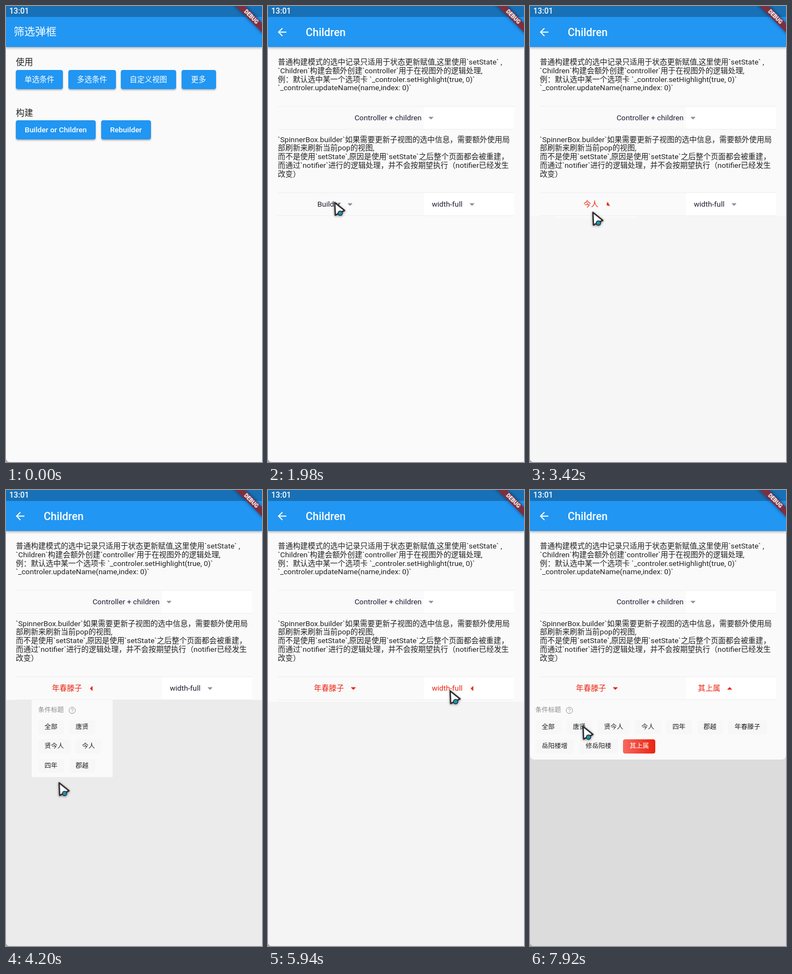
An HTML page that plays this animation: 468 by 834 pixels, repeating every 8 s.

```html
<!DOCTYPE html>
<html lang="zh-CN">
<head>
<meta charset="utf-8">
<title>Spinner</title>
<style>
html, body { margin: 0; width: 100%; height: 100%; overflow: hidden; background: #a9a9a9; }
body, .home, .page { font: 13.7px/15.75px Roboto, "Noto Sans CJK SC", "Noto Sans CJK", sans-serif; color: #212121; }
#stage { position: absolute; left: 0; top: 0; width: 468px; height: 834px; overflow: hidden; border-radius: 0 0 0 7px; }
#stage div, #stage svg.abs { position: absolute; white-space: pre; }
#stage .home, #stage .page, #stage .veil { left: 0; top: 0; width: 468px; height: 834px; background: #fafafa; }
#stage .veil { background: #000; opacity: 0; }
#stage .page { transform: translateX(490px); box-shadow: -2px 0 5px rgba(0,0,0,.22); }
.bar { left: 0; top: 0; width: 468px; height: 75px; background: #2196f3; box-shadow: 0 2px 4px rgba(0,0,0,.3); }
.title { top: 36px; color: #fff; font-size: 19.6px; line-height: 24px; }
.title.en, .btn.en { font-weight: 500; }
.title.en { top: 37px; }
.label { left: 18px; font-size: 15.7px; line-height: 20px; }
.btn { height: 35.3px; line-height: 35.3px; border-radius: 4px; background: #2196f3; color: #fff; text-align: center;
  box-shadow: 0 2px 3px rgba(0,0,0,.28); }
.text { left: 18px; }
.row { left: 18px; width: 432px; height: 41px; border: solid #eee; border-width: 1px 0;
  background: linear-gradient(90deg, #fafafa 267px, #fff 267px); }
.cell { top: 0; height: 41px; color: #1d1d33; --arrow: #8f8f99; }
.pick { inset: 0; display: flex; align-items: center; justify-content: center; gap: 5px; }
.pick svg { width: 24px; height: 24px; fill: var(--arrow); stroke: var(--arrow); stroke-linejoin: round; }
.barrier { left: 0; top: 384px; width: 468px; height: 450px; background: #000; opacity: 0; }
.panel { top: 384px; box-sizing: border-box; padding: 0 11.8px; background: #fafafa; border-radius: 0 0 8px 8px;
  font-size: 11.75px; clip-path: inset(0 0 100% 0); }
.panel.wide { padding: 0 9.8px; }
.head { top: 11px; color: #8c8c8c; }
.head svg { position: absolute; left: 55px; top: 1px; }
.chips { top: 37px; display: flex; flex-wrap: wrap; gap: 9.75px 9.8px; }
#stage .chip { position: relative; padding: 0 11.75px; line-height: 25.6px; border-radius: 4px; background: #f7f7f7; }
.chip b { position: absolute; inset: 0; text-align: center; font-weight: 400; border-radius: 4px; color: #fff;
  background: linear-gradient(90deg, #f7695f, #ea230f); opacity: 0; }
.status { left: 0; top: 0; width: 468px; height: 20px; background: rgba(0,0,0,.25); }
.clock { left: 6px; top: 1.5px; color: #fff; font-size: 14.2px; font-weight: 500; }
.debug { left: 408px; top: 13.5px; width: 80px; height: 12px; transform: rotate(45deg); background: #7c2f41;
  box-shadow: 0 0 6px rgba(0,0,0,.5); color: #fff; font-size: 10px; line-height: 12.4px; font-weight: 900; text-align: center; }
.cursor { left: -1px; top: -1px; overflow: visible; filter: drop-shadow(0 1px 2px rgba(0,0,0,.45)); }
</style>
</head>
<body>
<div id="stage">
  <div class="home">
    <div class="bar"></div>
    <div class="title" style="left:14px">筛选弹框</div>
    <div class="label" style="top:93px">使用</div>
    <div class="btn" style="left:18px;top:116.5px;width:86.3px">单选条件</div>
    <div class="btn" style="left:114px;top:116.5px;width:86.5px">多选条件</div>
    <div class="btn" style="left:210px;top:116.5px;width:100.6px">自定义视图</div>
    <div class="btn" style="left:320.5px;top:116.5px;width:63px">更多</div>
    <div class="label" style="top:186px">构建</div>
    <div class="btn en" style="left:18px;top:209px;width:146px">Builder or Children</div>
    <div class="btn en" style="left:174px;top:209px;width:90.5px">Rebuilder</div>
  </div>
  <div class="veil"></div>
  <div class="page">
    <div class="bar"></div>
    <svg class="abs" style="left:14px;top:36px" width="23.5" height="23.5" viewBox="0 0 24 24"><path fill="#fff" d="M20 11H7.83l5.59-5.59L12 4l-8 8 8 8 1.41-1.41L7.83 13H20z"/></svg>
    <div class="title en" style="left:69px">Children</div>
    <div class="text" style="top:95px">普通构建模式的选中记录只适用于状态更新赋值,这里使用`setState` ,
`Children`构建会额外创建`controller`用于在视图外的逻辑处理,
例：默认选中某一个选项卡 `_controler.setHighlight(true, 0)`
`_controler.updateName(name,index: 0)`</div>
    <div class="row" style="top:183px"><div class="cell" id="single" style="left:0;width:432px"></div></div>
    <div class="text" style="top:236.5px">`SpinnerBox.builder`如果需要更新子视图的选中信息，需要额外使用局
部刷新来刷新当前pop的视图,
而不是使用`setState`,原因是使用`setState`之后整个页面都会被重建，
而通过`notifier`进行的逻辑处理，并不会按期望执行（notifier已经发生
改变）</div>
    <div class="row" style="top:341px">
      <div class="cell" id="left" style="left:0;width:216px"></div>
      <div class="cell" id="right" style="left:216px;width:216px"></div>
    </div>
    <div class="barrier"></div>
    <div class="panel" id="narrow" style="left:47px;width:147.5px;height:286px"></div>
    <div class="panel wide" id="wide" style="left:0;width:468px;height:109px"></div>
  </div>
  <div class="status"></div>
  <div class="debug">DEBUG</div>
  <div class="clock">13:01</div>
  <svg class="abs cursor" width="26" height="30"><path d="M2 2.5L3 25.5L20 17Z" fill="#fff" stroke="#2f2f33" stroke-width="2.6" stroke-linejoin="round"/><circle cx="12" cy="22" r="4" fill="#1597b5" stroke="#2f2f33" stroke-width="1.6"/></svg>
</div>
<script>
const LOOP = 8000;
const RED = '#ea230f';
const $ = s => document.querySelector(s);

// steps: [ms, properties, easing towards the next step]
function play(el, steps) {
  const first = steps[0], last = steps[steps.length - 1];
  const all = [...steps];
  if (first[0] > 0) all.unshift([0, first[1]]);
  if (last[0] < LOOP) all.push([LOOP, last[1]]);
  el.animate(all.map(([ms, props, easing = 'linear']) => ({ offset: ms / LOOP, easing, ...props })),
    { duration: LOOP, iterations: Infinity });
}

// Switches between two states during the given spans of time.
function toggle(el, spans, off, on, inMs = 0, outMs = 0, easing) {
  const steps = [];
  for (const [from, to] of spans) {
    if (from > 0) steps.push([from, off, easing]);
    steps.push([from + inMs, on], [to, on]);
    if (to < LOOP) steps.push([to + outMs, off]);
  }
  play(el, steps);
}
const show = (el, ...span) => toggle(el, [span], { opacity: 0 }, { opacity: 1 });

const leftOpen = [[2000, 2880], [3380, 4140], [4700, 5520]];
const rightOpen = [[5880, 6840], [7345, LOOP]];

function fillCell(id, labels, open) {
  const cell = $(id);
  for (const [text, from, to] of labels) {
    const pick = document.createElement('div');
    pick.className = 'pick';
    pick.innerHTML = `<span>${text}</span><svg viewBox="0 0 24 24"><path d="M8 10.2H16L12 14.1Z"/></svg>`;
    cell.append(pick);
    if (!open) continue;
    show(pick, from, to);
    const arrow = pick.lastChild;
    toggle(arrow, open, { transform: 'rotate(0deg)' }, { transform: 'rotate(180deg)' }, 120, 120);
    toggle(arrow, [[open[0][0], LOOP]], { fill: '#8f8f99', stroke: '#8f8f99' }, { fill: RED, stroke: RED });
  }
  if (open) toggle(cell, [[open[0][0], LOOP]], { color: '#1d1d33' }, { color: RED });
}

function fillPanel(id, chosen, open) {
  const panel = $(id);
  const names = '全部 唐贤 贤今人 今人 四年 郡越 年春滕子 岳阳楼增 修岳阳楼 其上属'.split(' ');
  panel.innerHTML = `<div class="head">条件标题<svg width="14" height="14" fill="none" stroke="#999">
    <circle cx="7" cy="7" r="5.8"/><path d="M5.2 5.8a1.8 1.8 0 1 1 2.6 1.5q-.8.4-.8 1.2M7 9.6v1"/></svg></div>
    <div class="chips">${names.map(n => `<div class="chip">${n}</div>`).join('')}</div>`;
  panel.querySelector('.chips').style.width = id === '#wide' ? '448.4px' : '124px';
  for (const [name, from, to] of chosen) {
    const mark = document.createElement('b');
    mark.textContent = name;
    panel.querySelectorAll('.chip')[names.indexOf(name)].append(mark);
    show(mark, from, to);
  }
  toggle(panel, open, { clipPath: 'inset(0 0 100% 0)' }, { clipPath: 'inset(0 0 0% 0)' },
    350, 120, 'cubic-bezier(.7,0,.3,1)');
}

fillCell('#single', [['Controller + children']]);
fillCell('#left', [['Builder', 0, 2880], ['今人', 2880, 4140], ['年春滕子', 4140, LOOP]], leftOpen);
fillCell('#right', [['width-full', 0, 6840], ['其上属', 6840, LOOP]], rightOpen);
fillPanel('#narrow', [['今人', 2880, 4140], ['年春滕子', 4140, LOOP]], leftOpen);
fillPanel('#wide', [['年春滕子', 0, 6840], ['其上属', 6840, LOOP]], rightOpen);
toggle($('.barrier'), [...leftOpen, ...rightOpen], { opacity: 0 }, { opacity: .12 }, 320, 120);

// Page change: the new page slides in, the old one grows and darkens.
const push = (el, from, to) => play(el, [[821, from, 'cubic-bezier(.4,0,.2,1)'], [1121, to]]);
push($('.page'), { transform: 'translateX(474px)' }, { transform: 'translateX(0px)' });
push($('.home'), { transform: 'scale(1)' }, { transform: 'scale(1.052)' });
push($('.veil'), { opacity: 0 }, { opacity: .1 });

const route = [
  [220, 490, 300], [800, 95, 226], [1080, 95, 226], [1420, 140, 322], [1800, 121, 358], [2160, 121, 358],
  [2700, 146, 462], [2900, 146, 462], [3180, 114, 376], [3480, 114, 376], [3960, 96, 535], [4180, 96, 535],
  [4560, 113, 366], [4860, 113, 366], [5340, 323, 443], [5560, 323, 443], [5800, 332, 366], [6000, 332, 366],
  [6600, 199, 467], [6660, 198, 470], [6960, 198, 470], [7200, 313, 366], [7440, 313, 366], [7910, 96, 431]
];
play($('.cursor'), route.map(([ms, x, y]) => [ms, { transform: `translate(${x}px,${y}px)` }, 'ease-in-out']));
</script>
</body>
</html>
```
